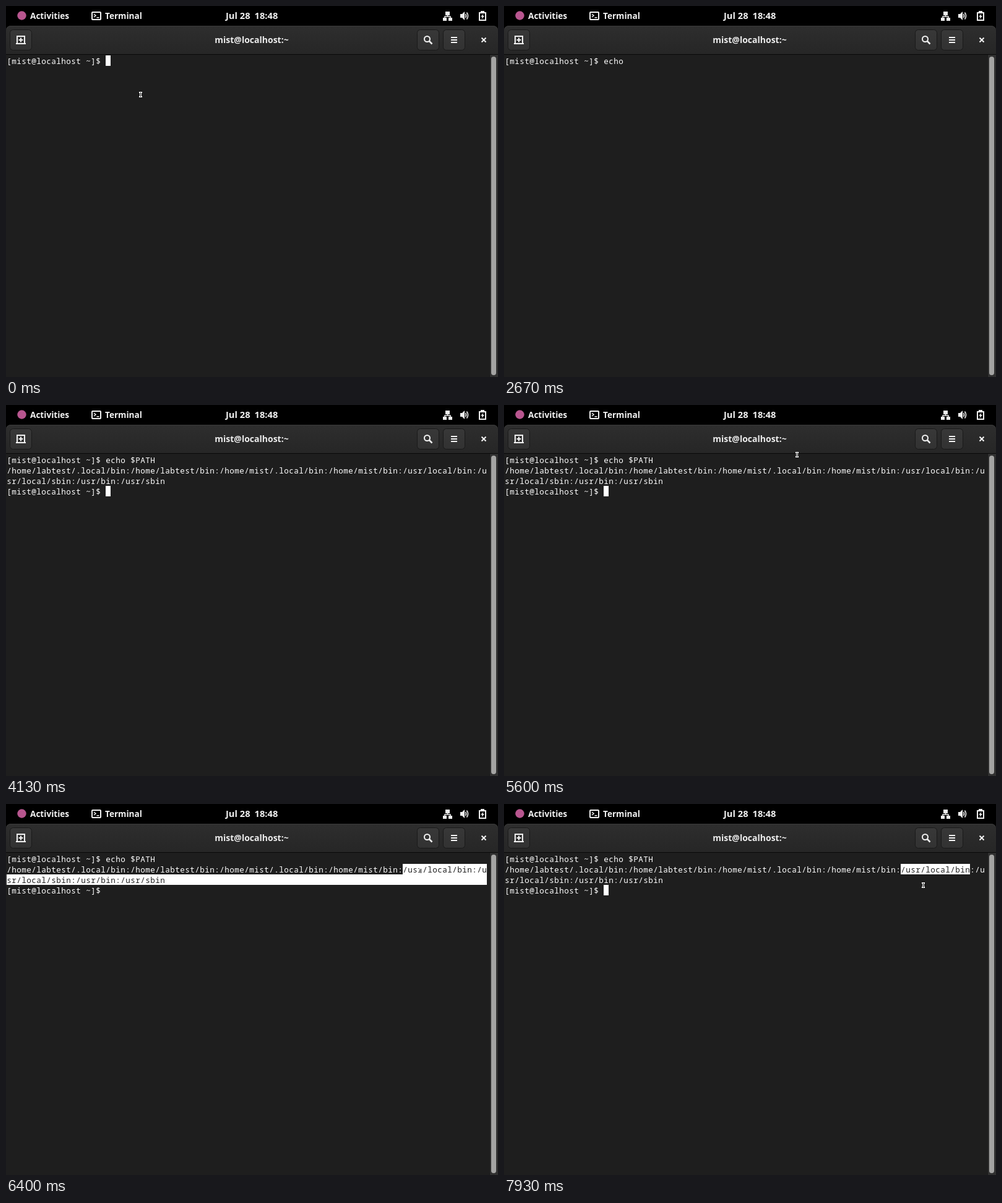
An HTML page that plays this animation: 795x601 px, repeating every 8 s.

```html
<!DOCTYPE html>
<html lang="en">
<head>
<meta charset="utf-8">
<title>Terminal</title>
<style>
  html, body { margin: 0; width: 100%; height: 100%; overflow: hidden; background: #000; }
  svg { display: block; width: 100%; height: 100%; }
  .ui text { font: 700 13.6px "Noto Sans", "Open Sans", sans-serif; fill: #f2f2f2; }
  .ui .title { font-size: 14px; text-anchor: middle; fill: #ececec; }
  .ui .clock { font-size: 14.7px; }
  .line { fill: none; stroke: #f2f2f2; stroke-width: 2; }
  .solid { fill: #f2f2f2; }
  .button { fill: url(#button); stroke: #191919; }
  .cells text { font: 400 12.6px "Noto Sans Mono", "DejaVu Sans Mono", monospace; white-space: pre; }
</style>
</head>
<body>
<svg viewBox="0 0 795 601" xmlns="http://www.w3.org/2000/svg">
  <defs>
    <linearGradient id="header" x2="0" y2="1">
      <stop stop-color="#2e2e2e"/><stop offset="1" stop-color="#262626"/>
    </linearGradient>
    <linearGradient id="button" x2="0" y2="1">
      <stop stop-color="#383838"/><stop offset="1" stop-color="#323232"/>
    </linearGradient>
    <clipPath id="picked"></clipPath>
  </defs>

  <rect width="795" height="601" fill="#000"/>
  <g class="ui">
    <circle cx="25.5" cy="15.5" r="7.2" fill="#b8568f"/>
    <text x="39" y="21">Activities</text>
    <rect class="line" x="139" y="10" width="14" height="12" rx="1"/>
    <path class="line" d="M142 13l3 2.5l-3 2.5M146.5 18.7h4" stroke-width="1.5" style="stroke-width:1.5"/>
    <text x="160" y="21">Terminal</text>
    <text class="clock" x="355" y="21">Jul 28</text>
    <text class="clock" x="401.5" y="21">18:48</text>

    <path class="solid" d="M710 9h7v6h-7zM706 19h6v5h-6zM715 19h6v5h-6z"/>
    <path class="line" d="M713.5 15v2M709 19v-2h9v2" style="stroke-width:1.5"/>
    <path class="solid" d="M734 13h3l4-4v14l-4-4h-3z"/>
    <path class="line" d="M742.5 13q2 3 0 6" style="stroke-width:1.6"/>
    <path class="line" d="M744.5 10.5q4 5.500 0 11" style="stroke-width:1.6"/>
    <path class="line" d="M765 11h10v12h-10z"/>
    <path class="solid" d="M767 8h6v3h-6zM771.500 12.500l-4.500 5h2.500l-1 4l4.500-5.500h-2.500z"/>

    <path d="M0 79V40q0-8 8-8H787q8 0 8 8V79z" fill="url(#header)"/>
    <path d="M1 37q2-4.500 7-4.500H787q5 0 7 4.500" fill="none" stroke="#3a3a3a"/>
    <rect y="78" width="795" height="1" fill="#080808"/>
    <rect class="button" x="6.5" y="38.500" width="35" height="33" rx="5"/>
    <rect class="button" x="664.5" y="38.500" width="35" height="33" rx="5"/>
    <rect class="button" x="706.5" y="38.500" width="35" height="33" rx="5"/>
    <path class="line" d="M18 61V49H30V61M16 61H32M24 51.500v7M20.500 55h7"/>
    <circle class="line" cx="680.500" cy="53.500" r="4.500"/>
    <path class="line" d="M683.500 56.500l5 5" style="stroke-width:2.500"/>
    <path class="line" d="M719 51h10M719 55h10M719 59h10"/>
    <path class="line" d="M768.500 51.500l7 7M775.500 51.500l-7 7"/>
    <text class="title" x="397" y="60">mist@localhost:~</text>
  </g>

  <rect y="79" width="795" height="522" fill="#1e1e1e"/>
  <rect x="781" y="79" width="14" height="522" fill="#303030"/>
  <rect x="781" y="79" width="1" height="522" fill="#191919"/>
  <rect x="784" y="82" width="8" height="516" rx="4" fill="#a4a4a3"/>

  <g class="cells" id="plain" fill="#fff"></g>
  <rect id="caret" width="8" height="17" fill="#fff"/>
  <g clip-path="url(#picked)">
    <rect y="79" width="781" height="70" fill="#fff"/>
    <g class="cells" id="inverse" fill="#1e1e1e"></g>
  </g>
  <g id="pointer">
    <path d="M-2 -4H3V-2H2V3H3V5H-2V3H-1V-2H-2z" fill="#fff"/>
    <path d="M0 -3H1V4H0z" fill="#000"/>
  </g>
</svg>
<script>
const $ = id => document.getElementById(id);
const NS = "http://www.w3.org/2000/svg";
const LOOP = 8000, TICK = 1000 / 15;
const CELL = 8, ROW = 17, LEFT = 1, TOP = 80, COLS = 97;

const prompt = "[mist@localhost ~]$ ";
const command = "echo $PATH";
const path = ["/home/labtest/.local/bin", "/home/labtest/bin", "/home/mist/.local/bin",
  "/home/mist/bin", "/usr/local/bin", "/usr/local/sbin", "/usr/bin", "/usr/sbin"].join(":");
const pickFrom = path.indexOf("/usr/local/bin");

// All times below are in ticks of 1/15 s.
const keys = [20, 22, 23, 25, 26, 45, 51, 53, 55, 57];
const enter = 62;
const caretOff = [[2, 11], [40, 45], [71, 80], [89, 98], [107, 116]];
const pointerOff = [20, 80];
const dragStart = 95, dragBack = 97;
const route = [
  [0, 217, 143], [1, 220, 140], [2, 223, 138], [3, 224, 137], [79, 224, 137],
  [80, 240, 131], [82, 355, 99], [84, 473, 80], [86, 563, 87], [88, 627, 103], [89, 637, 107],
  [94, 637, 107], [95, 648, 117], [96, 670, 108], [98, 697, 104], [101, 729, 101],
  [104, 745, 99], [106, 749, 98], [112, 749, 98], [113, 746, 101], [116, 721, 116], [119, 677, 131]
];

const within = (t, [from, to]) => t >= from && t < to;

function pointerAt(t) {
  const i = route.findIndex(p => p[0] >= t);
  const b = route[i], a = route[Math.max(0, i - 1)];
  const k = b === a ? 0 : (t - a[0]) / (b[0] - a[0]);
  return [1, 2].map(n => Math.round(a[n] + (b[n] - a[n]) * k));
}

function add(parent, tag, attrs) {
  const el = document.createElementNS(NS, tag);
  for (const name in attrs) el.setAttribute(name, attrs[name]);
  return parent.appendChild(el);
}

function write(group, lines) {
  group.replaceChildren();
  lines.forEach((line, row) => {
    const x = [...line].map((_, i) => LEFT + 0.2 + i * CELL).join(" ");
    add(group, "text", { x, y: TOP + row * ROW + 14 }).textContent = line;
  });
}

function select(spans) {
  $("picked").replaceChildren();
  for (const [row, from, to] of spans)
    add($("picked"), "rect", {
      x: LEFT + from * CELL, y: TOP + row * ROW, width: (to - from) * CELL, height: ROW
    });
}

function draw(t) {
  const typed = command.slice(0, keys.filter(k => k <= t).length);
  const lines = [prompt + typed];
  if (t >= enter) lines.push(path.slice(0, COLS), path.slice(COLS), prompt);
  write($("plain"), lines);
  write($("inverse"), lines);

  const row = lines.length - 1;
  $("caret").setAttribute("x", LEFT + lines[row].length * CELL);
  $("caret").setAttribute("y", TOP + row * ROW);
  $("caret").style.display = caretOff.some(span => within(t, span)) ? "none" : "";

  const [x, y] = pointerAt(t);
  $("pointer").setAttribute("transform", `translate(${x} ${y})`);
  $("pointer").style.display = within(t, pointerOff) ? "none" : "";

  if (t < dragStart) select([]);
  else if (t < dragBack) select([[1, pickFrom, COLS], [2, 0, COLS]]);
  else select([[1, pickFrom, Math.min(94, Math.floor((Math.max(x, 749 * (t > 105)) - LEFT + CELL / 2) / CELL))]]);
}

const start = performance.now();
let last = -1;
function frame() {
  const ms = (performance.now() - start) % LOOP;
  const t = Math.min(119, Math.floor((ms + 4) / TICK));
  if (t !== last) draw(last = t);
  requestAnimationFrame(frame);
}
frame();
</script>
</body>
</html>
```
